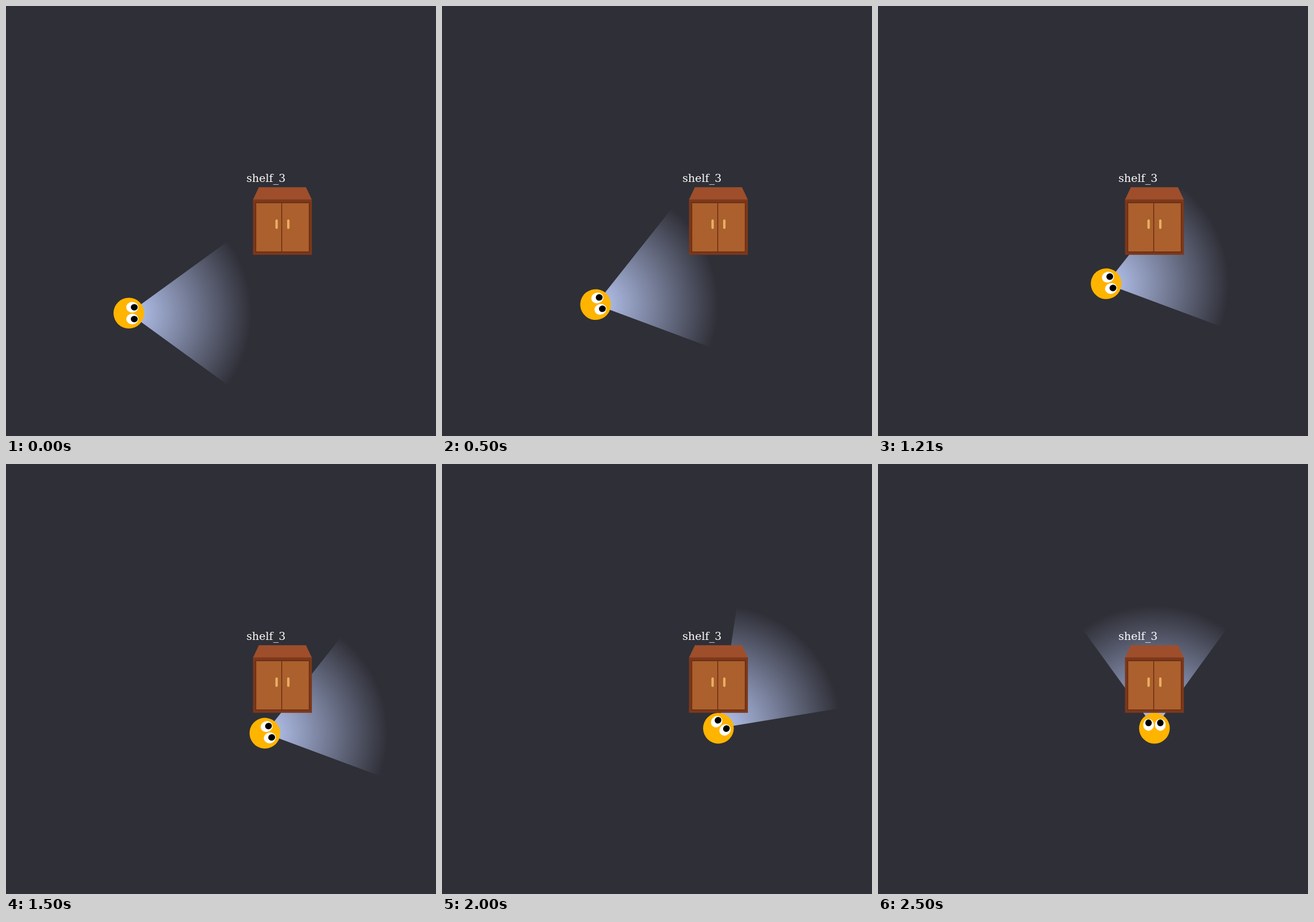
An HTML page with a canvas that plays this animation: 748x748 px, repeating every 2.93 s.

```html
<!DOCTYPE html>
<html lang="en">
<head>
<meta charset="utf-8">
<title>Approaching a shelf</title>
<style>
  html, body { margin: 0; width: 100%; height: 100%; overflow: hidden; background: #2f2f37; }
  canvas { display: block; width: 748px; height: 748px; }
</style>
</head>
<body>
<canvas id="stage" width="748" height="748"></canvas>
<script>
const ctx = document.getElementById('stage').getContext('2d');
const SIZE = 748, CELL = SIZE / 7;
const LOOP = 2930, LAST_STEP = 60;
const BODY = CELL / 4, SIGHT = CELL * 2, HALF_VIEW = Math.PI / 5;
const start = { x: 2 * CELL, y: 5 * CELL };
const goal = { x: 4.5 * CELL, y: 4.302 * CELL };
const heading = Math.atan2(goal.y - start.y, goal.x - start.x);

const progress = (v, from, to) => Math.min(1, Math.max(0, (v - from) / (to - from)));
const mix = (a, b, k) => a + (b - a) * k;

// 24 steps per second, each shown from the nearest 10 ms
function stepAt(ms) {
  let step = 0;
  while (step < LAST_STEP && Math.round((step + 1) * 12.5 / 3) * 10 <= ms) step++;
  return step;
}

// Turn towards the shelf, drive up to it, then turn to face it
function poseAt(step) {
  const drive = progress(step, 5, 40);
  const firstTurn = step < 3 ? 0 : progress(step, 1.5, 5);
  return {
    x: mix(start.x, goal.x, drive),
    y: mix(start.y, goal.y, drive),
    angle: step <= 40 ? heading * firstTurn
                      : mix(heading, -Math.PI / 2, progress(step, 40, 60))
  };
}

function rect(x, y, w, h, color) {
  ctx.fillStyle = color;
  ctx.fillRect(x, y, w, h);
}

function oval(x, y, rx, ry, color) {
  ctx.fillStyle = color;
  ctx.beginPath();
  ctx.ellipse(x, y, rx, ry, 0, 0, 2 * Math.PI);
  ctx.fill();
}

function inPose(pose, draw) {
  ctx.save();
  ctx.translate(pose.x, pose.y);
  ctx.rotate(pose.angle);
  draw();
  ctx.restore();
}

function drawView() {
  const light = ctx.createRadialGradient(0, 0, 0, 0, 0, SIGHT);
  light.addColorStop(0, 'rgba(185,200,244,1)');
  light.addColorStop(1, 'rgba(185,200,244,0)');
  ctx.fillStyle = light;
  ctx.beginPath();
  ctx.moveTo(0, 0);
  ctx.arc(0, 0, SIGHT, -HALF_VIEW, HALF_VIEW);
  ctx.fill();
}

function drawRobot() {
  oval(0, 0, BODY, BODY, '#ffb400');
  for (const side of [-10.25, 10.25]) {
    oval(6, side, 10.5, 9.3, '#fff');
    oval(9.4, side, 6, 5.6, '#000');
  }
}

function drawShelf() {
  ctx.fillStyle = '#9e4e2b';
  ctx.beginPath();
  ctx.moveTo(429.6, 337);
  ctx.lineTo(439.9, 315.3);
  ctx.lineTo(521.8, 315.3);
  ctx.lineTo(532.1, 337);
  ctx.fill();
  rect(429.6, 336.5, 102.5, 96.3, '#7b381c');

  rect(434.5, 342.3, 93, 85.4, '#ab602e');
  ctx.strokeStyle = '#692b10';
  ctx.lineWidth = 1.4;
  ctx.strokeRect(434.5, 342.3, 93, 85.4);
  ctx.beginPath();
  ctx.moveTo(479.6, 342.3);
  ctx.lineTo(479.6, 427.7);
  ctx.stroke();

  ctx.fillStyle = '#e9ae62';
  for (const x of [468.6, 489]) {
    ctx.beginPath();
    ctx.roundRect(x, 371.3, 4.2, 16.4, 2);
    ctx.fill();
  }
}

function drawLabel() {
  ctx.fillStyle = '#fff';
  ctx.font = '19px "DejaVu Serif", serif';
  ctx.fillText('shelf_3', 418.3, 306);
}

function render(now) {
  const pose = poseAt(stepAt(now % LOOP));
  rect(0, 0, SIZE, SIZE, '#2f2f37');
  inPose(pose, drawView);
  drawShelf();
  drawLabel();
  inPose(pose, drawRobot);
}

function tick() {
  render(performance.now());
  requestAnimationFrame(tick);
}
tick();
</script>
</body>
</html>
```
